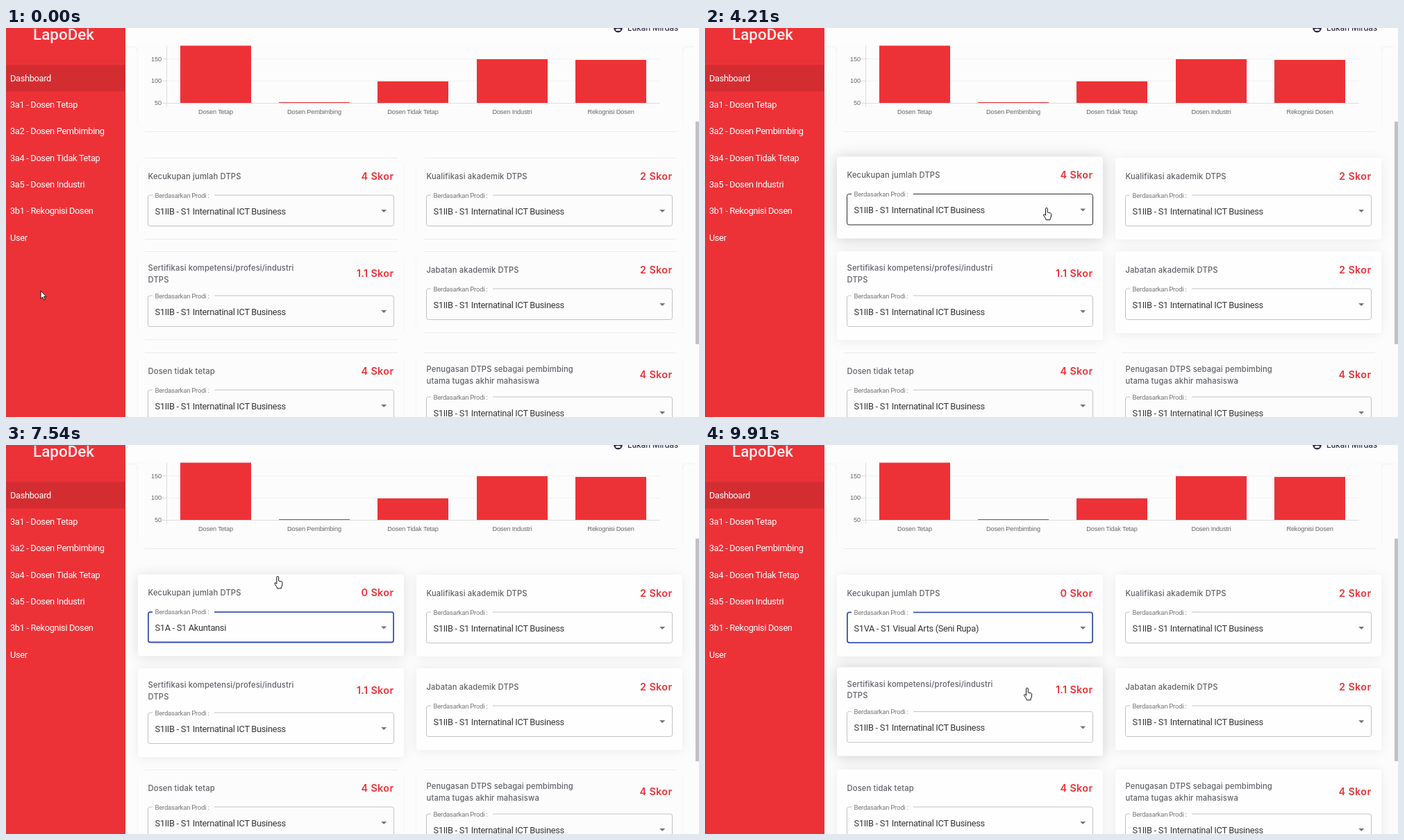
Write an HTML page that moves like this. It is 998 px wide and 561 px high and loops after 9.96 s.

```html
<!DOCTYPE html>
<html lang="id">
<head>
<meta charset="utf-8">
<title>Dashboard</title>
<style>
  html, body { margin: 0; width: 100%; height: 100%; overflow: hidden; background: #fcfcfc; }
  svg { display: block; width: 998px; height: 561px; }
  text { font-family: Roboto, sans-serif; font-size: 12.8px; letter-spacing: -.32px; white-space: pre; }
  .logo { font-size: 22.4px; font-weight: 500; letter-spacing: 0; fill: #ffeded; }
  .nav { fill: #fff; }
  .tick { font-family: "Liberation Sans", Arial, sans-serif; font-size: 9.2px; letter-spacing: -.15px; fill: #666; }
  .title, .user { font-family: Inter, sans-serif; font-size: 11.2px; font-weight: 500; letter-spacing: .15px; fill: #5f6167; }
  .user { font-size: 11.4px; letter-spacing: 0; fill: #2b2b45; }
  .score { font-family: Inter, sans-serif; font-size: 14.4px; font-weight: 600; letter-spacing: .35px; fill: #ed3237; }
  .label { font-size: 9.6px; letter-spacing: -.27px; fill: #777; }
  .value { letter-spacing: -.3px; fill: #363636; }
  .item { letter-spacing: -.37px; fill: #444; }
  .box { fill: none; }
</style>
</head>
<body>
<script>
const LOOP = 9960, RED = '#ed3237', GROW = 389, PITCH = 28.75, FIRST = 44.5;

const programs = [
  'S1IIB - S1 Internatinal ICT Business',
  'S1MBTI - S1 Manajemen Bisnis Telekomunikasi dan Informatika (MBTI)',
  'S1A - S1 Akuntansi', 'S2M - S2 Manajemen', 'S1RPL - S1 Rekayasa Perangkat Lunak',
  'S1IF - S1 Informatika', 'S1IFI - S1 Informatika (Internasional)',
  'S1TEKINF - S1 Teknologi Informasi', 'S2IF - S2 Informatika', 'S1DI - S1 Desain Interior',
  'S1DKV - S1 Design Komunikasi Visual', 'S1DKVI - S1 Desain Komunikasi Visual (Internasional)',
  'S1PIM - S1 Produk Innovation and Management', 'S1K - S1 Kriya (Fashion and Textile Design)',
  'S1VA - S1 Visual Arts (Seni Rupa)', 'S2D - S2 Desain',
  'D3SIA - D3 Sistem Informasi Akuntansi', 'D3SI - D3 Sistem Informasi',
  'D3DM - D3 Digital Marketing'
];

// pointer hot spot: time, x, y
const path = [
  [0, 50, 379], [1050, 50, 379], [1210, 73, 373], [1440, 73, 373], [1700, 112, 340],
  [2050, 181, 309], [2120, 183, 308], [2360, 240, 275], [2440, 240, 275], [2800, 340, 225],
  [3200, 470, 250], [3440, 540, 255], [3700, 660, 250], [3820, 665, 255], [4150, 497, 260],
  [4210, 492, 259], [4280, 491, 257], [4430, 489, 250], [4540, 489, 250], [4580, 483, 251],
  [5400, 483, 251], [5750, 340, 133], [5820, 339, 132], [5980, 336, 128], [7140, 336, 128],
  [8060, 463, 268], [8420, 463, 268], [8980, 452, 455], [9560, 452, 455], [9880, 464, 350], [LOOP, 464, 350]
];
// menu: opens, closes, selected row
const menus = [[4650, 6413, 0], [8041, 9120, 2]];
// card hover: card, from, to
const hovers = [[0, 2200, 3480], [1, 3500, 3900], [0, 3930, 4650], [0, 7480, 8041], [2, 9690, LOOP + 500]];

const clamp = v => Math.max(0, Math.min(1, v));
const bez = (a, b, s) => 3 * a * s * (1 - s) ** 2 + 3 * b * s * s * (1 - s) + s ** 3;
function ease(x) {
  x = clamp(x);
  let lo = 0, hi = 1;
  for (let i = 0; i < 20; i++) {
    const mid = (lo + hi) / 2;
    if (bez(.4, .2, mid) < x) lo = mid; else hi = mid;
  }
  return bez(0, 1, lo);
}

function el(tag, attrs, parent, text) {
  const node = document.createElementNS('http://www.w3.org/2000/svg', tag);
  for (const k in attrs) node.setAttribute(k, attrs[k]);
  if (text !== undefined) node.textContent = text;
  parent.appendChild(node);
  return node;
}
const rect = (parent, x, y, width, height, fill, more) => el('rect', { x, y, width, height, fill, ...more }, parent);
const line = (parent, d, stroke) => el('path', { d, stroke, fill: 'none' }, parent);
const label = (parent, cls, x, y, text, anchor = 'start') =>
  el('text', { class: cls, x, y, 'text-anchor': anchor }, parent, text);
const set = (node, attrs) => { for (const k in attrs) node.setAttribute(k, attrs[k]); };

const svg = el('svg', { viewBox: '0 0 998 561' }, document.body);
rect(svg, 0, 0, 998, 561, '#fcfcfc');

function outline(parent, x, y, w, h) {
  line(parent, `M${x + 10} ${y + .5}H${x + w - 9}M${x + 10} ${y + h - .5}H${x + w - 9}`, '#ebebeb');
  line(parent, `M${x - .5} ${y + 10}V${y + h - 10}M${x + w + .5} ${y + 10}V${y + h - 10}`, '#f5f5f5');
}

function drawChart() {
  outline(svg, 190, -60, 784, 210);
  line(svg, 'M231 44.5H942M231 76.5H942', '#f1f1f1');
  line(svg, 'M231.5 25V114M225 44.5h6M225 76.5h6M225 108.5H942', '#dcdcdc');
  ['150', '100', '50'].forEach((s, i) => label(svg, 'tick', 224, 47.6 + i * 31.8, s, 'end'));
  const bars = [['Dosen Tetap', 0], ['Dosen Pembimbing', 107], ['Dosen Tidak Tetap', 77],
    ['Dosen Industri', 45], ['Rekognisi Dosen', 46]];
  bars.forEach(([name, top], i) => {
    const x = Math.round(251 + i * 142.2);
    rect(svg, x, top, 102, 108 - top, RED);
    label(svg, 'tick', x + 51, 124.4, name, 'middle');
  });
}

// select border with a gap for its label
function border({ left, right, top, bottom }, inset) {
  const l = left + inset, r = right - inset, t = top + inset, b = bottom - inset;
  return `M${left + 95.5} ${t}H${r - 3}q3 0 3 3V${b - 3}q0 3-3 3H${l + 3}q-3 0-3-3V${t + 3}q0-3 3-3H${left + 6.5}`;
}

function makeCard([x, y, lines, score, seen]) {
  const extra = (lines.length - 1) * 10, h = 118 + extra, w = 383;
  const flat = el('g', {}, svg);
  outline(flat, x, y, w, h);
  const g = el('g', {}, svg);
  const back = rect(g, x, y, w, h, '#fefefe', { rx: 4 });
  const mid = y + (lines.length > 1 ? 32.4 : 27);
  const left = x + 14.5, right = x + 368.5, top = y + 54 + extra, bottom = top + 44.5;
  lines.forEach((s, i) => label(g, 'title', left, mid + 4 + (i - (lines.length - 1) / 2) * 16.2, s));
  const mark = label(g, 'score', right, mid + 5, score + ' Skor', 'end');
  const frame = el('path', { class: 'box' }, g);
  const tag = label(g, 'label', left + 10, top + 3.5, 'Berdasarkan Prodi :');
  const value = label(g, 'value', left + 10, top + 27.6, programs[0]);
  const arrow = el('path', { fill: '#757575' }, g);
  return { flat, g, back, mark, frame, tag, value, arrow, x, y, w, h, left, right, top, bottom, seen };
}

drawChart();
// x, y, title, score, time the soft shadow first shows
const cards = [
  [190, 187, ['Kecukupan jumlah DTPS'], 4, 2200],
  [591, 187, ['Kualifikasi akademik DTPS'], 2, 3500],
  [190, 322, ['Sertifikasi kompetensi/profesi/industri', 'DTPS'], 1.1, 3500],
  [591, 322, ['Jabatan akademik DTPS'], 2, 3500],
  [190, 468, ['Dosen tidak tetap'], 4, 9690],
  [591, 468, ['Penugasan DTPS sebagai pembimbing', 'utama tugas akhir mahasiswa'], 4, 9690]
].map(makeCard);

// top bar
rect(svg, 172, 0, 826, 25.5, '#fdfdfd');
line(svg, 'M173 27h10q6 0 6 8M991 27h-10q-6 0-6 8', '#f1f1f1');
el('circle', { cx: 881.5, cy: 0, r: 6.4, fill: '#2b2b45' }, svg);
el('ellipse', { cx: 881.5, cy: 2.6, rx: 3.7, ry: 1.5, fill: '#fff' }, svg);
label(svg, 'user', 895, 3.6, 'Lukan Mirdas');

// side bar
rect(svg, 0, 0, 172, 561, RED);
rect(svg, 0, 46.5, 172, 1, '#dd3035');
rect(svg, 0, 53, 172, 38.5, '#d32d32');
const userRow = rect(svg, 0, 283, 172, 38, '#e53035');
label(svg, 'logo', 83, 16.6, 'LapoDek', 'middle');
['Dashboard', '3a1 - Dosen Tetap', '3a2 - Dosen Pembimbing', '3a4 - Dosen Tidak Tetap',
  '3a5 - Dosen Industri', '3b1 - Rekognisi Dosen', 'User']
  .forEach((s, i) => label(svg, 'nav', 6, 76.6 + i * 38.33, s));

const pageBar = rect(svg, 993, 135, 5, 321, '#c1c1c1');

// drop-down list
const menu = el('g', {}, svg);
rect(menu, 204.5, 38, 430.5, 538, '#fcfcfc', { rx: 3, style: 'filter:drop-shadow(0 3px 4px rgba(0,0,0,.3))' });
const clip = el('clipPath', { id: 'paper' }, el('defs', {}, svg));
rect(clip, 204.5, 38, 430.5, 538, '#000');
const list = el('g', { 'clip-path': 'url(#paper)' }, menu);
const overRow = rect(list, 204.5, 0, 418.5, PITCH, '#f3f3f3');
const pickedRow = rect(list, 204.5, 0, 418.5, PITCH, '#e8e8e8');
programs.forEach((s, i) => label(list, 'item', 216, 63 + i * PITCH, s));
rect(list, 623, 38, 12, 538, '#f4f4f4');
rect(list, 624, 52, 9, 224, '#c1c1c1');
el('path', { d: 'M625.5 46.5h5l-2.5-3zM625.5 568h5l-2.5 3z', fill: '#8a8a8a' }, list);

const pen = { fill: '#fff', stroke: '#111', 'stroke-width': 1, 'stroke-linejoin': 'round' };
const arrowPtr = el('path', { d: 'M.5 .5V12L3.2 9.5 5 13.7 6.9 12.9 5.1 8.8H8.5z', ...pen }, svg);
const handPtr = el('path', {
  d: 'M3.5 1.8a1.4 1.4 0 0 1 2.8 0V7l4.2.9q1.3.4 1.2 1.8l-.5 4.3-1.2 2v1.8H4.2L3.8 16 .6 11.2q-.5-1.4 1-1.6l1.9 1.6z',
  ...pen
}, svg);

function pointer(t) {
  let i = 1;
  while (path[i][0] < t && i < path.length - 1) i++;
  const [t0, x0, y0] = path[i - 1], [t1, x1, y1] = path[i];
  const p = clamp((t - t0) / (t1 - t0));
  return [x0 + (x1 - x0) * p, y0 + (y1 - y0) * p];
}

const within = (x, y, l, t, r, b) => x >= l && x <= r && y >= t && y <= b;

function drawMenu(t, y) {
  const now = menus.find(([from, to]) => t >= from && t < to + GROW);
  menu.style.display = now ? '' : 'none';
  if (!now) return;
  const [from, to, picked] = now, closing = t >= to;
  const p = (t - (closing ? to : from)) / GROW;
  const s = closing ? 1 - .25 * ease((p - 1 / 3) * 1.5) : .75 + .25 * ease(p * 1.5);
  set(menu, {
    opacity: closing ? 1 - ease(p) : ease(p),
    transform: `translate(205 264) scale(${s} ${s * s}) translate(-205 -264)`
  });
  const row = Math.floor((y - FIRST) / PITCH);
  set(overRow, { y: FIRST + row * PITCH });
  set(pickedRow, { y: FIRST + picked * PITCH });
}

function drawCard(c, i, t, x, y, open) {
  let lift = 0;
  for (const [n, from, to] of hovers)
    if (n === i) lift = Math.max(lift, Math.min(ease((t - from) / 200), 1 - ease((t - to) / 120)));
  const seen = t >= c.seen;
  c.flat.style.display = seen ? 'none' : '';
  c.back.style.display = seen ? '' : 'none';
  c.back.style.filter = `drop-shadow(0 1px ${8 + 2 * lift}px rgba(0,0,0,${.07 + .12 * lift}))`;
  set(c.g, { transform: `translate(0 ${-1.6 * lift})` });

  const focus = i === 0 && t >= menus[0][0];
  const over = !open && within(x, y, c.left, c.top, c.right, c.bottom);
  set(c.frame, {
    d: border(c, focus ? .4 : 0),
    stroke: focus ? '#3a52ae' : over ? '#2a2a2a' : '#c2c2c2',
    'stroke-width': focus ? 1.8 : 1
  });
  const up = i === 0 && open, ax = c.right - 14.3, ay = c.top + 23;
  c.tag.style.fill = up ? '#3f51b5' : '';
  set(c.arrow, { d: up ? `M${ax - 4} ${ay + 2}h8l-4-4z` : `M${ax - 4} ${ay - 2}h8l-4 4z` });
}

function render(t) {
  const [x, y] = pointer(t);
  const open = menus.some(([from, to]) => t >= from && t < to);
  const listed = menus.some(([from, to]) => t >= from && t < to + GROW);

  cards.forEach((c, i) => drawCard(c, i, t, x, y, open));
  cards[0].value.textContent = programs[t < menus[0][1] ? 0 : t < menus[1][1] ? 2 : 14];
  cards[0].mark.textContent = (t < 6990 ? 4 : 0) + ' Skor';
  pageBar.style.display = open ? 'none' : '';
  userRow.style.display = within(x, y, 0, 283, 172, 321) ? '' : 'none';
  drawMenu(t, y);

  const hand = listed || t > menus[0][1] && t < 7140 || within(x, y, 0, 53, 172, 321) ||
    cards.some(c => within(x, y, c.x, c.y, c.x + c.w, c.y + c.h));
  handPtr.style.display = hand ? '' : 'none';
  arrowPtr.style.display = hand ? 'none' : '';
  set(handPtr, { transform: `translate(${x - 5} ${y})` });
  set(arrowPtr, { transform: `translate(${x - .5} ${y - .5})` });
}

const start = performance.now();
function tick() {
  render((performance.now() - start) % LOOP);
  requestAnimationFrame(tick);
}
tick();
</script>
</body>
</html>
```
